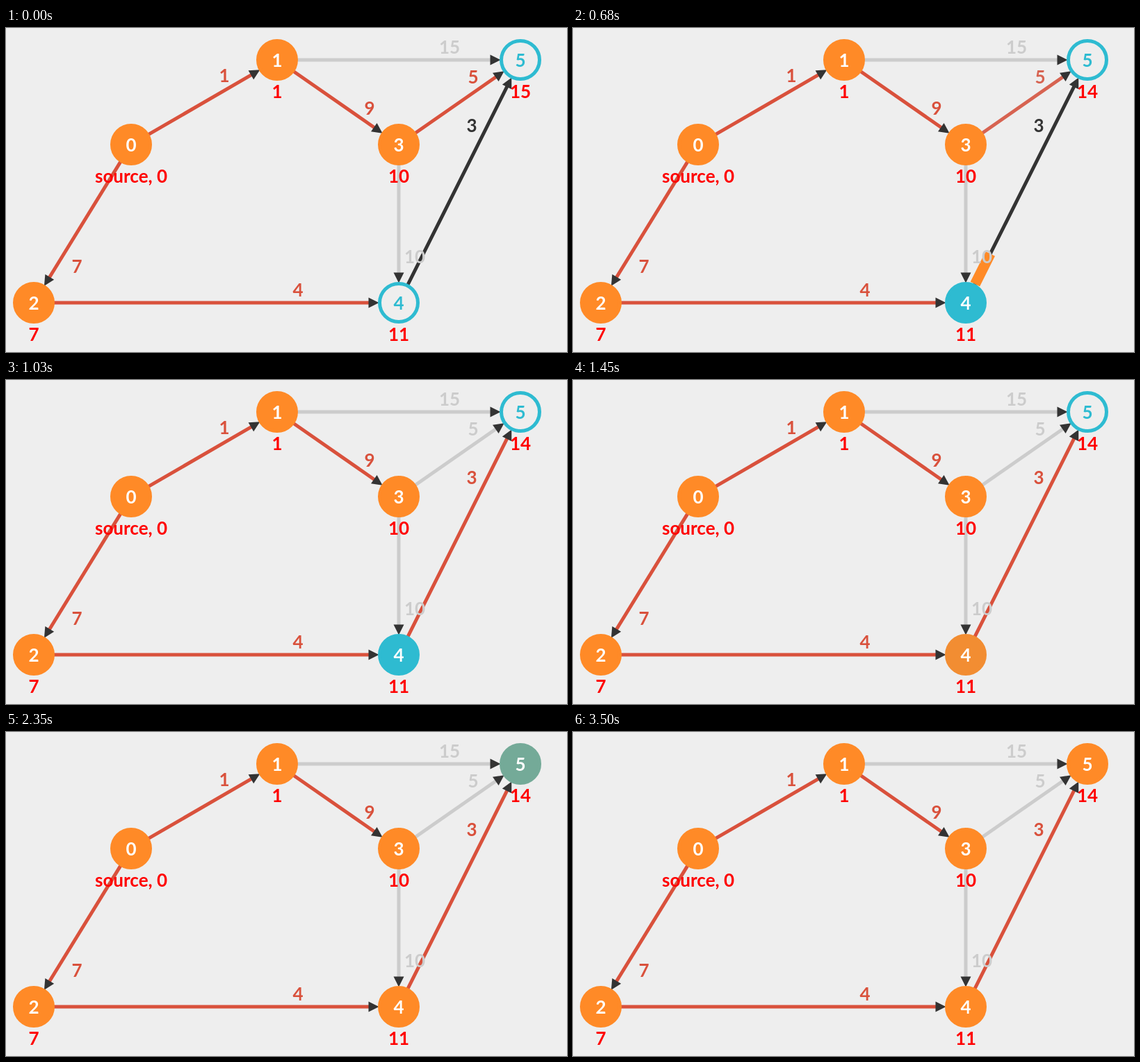
These frames come from a looping animation (807x467 px, 3.7 s). An HTML page:

```html
<!DOCTYPE html>
<html lang="en">
<head>
<meta charset="utf-8">
<title>Shortest paths</title>
<style>
  :root { --bg: #eee; --orange: #ff8a27; --cyan: #2ebbd1; --red: #d9513c; --grey: #ccc; --dark: #333; }
  html, body { margin: 0; width: 100%; height: 100%; overflow: hidden; background: var(--bg); }
  svg { display: block; width: 807px; height: 467px; }
  text { font: 700 26px Lato, "Open Sans", sans-serif; text-anchor: middle; }
  line { stroke-width: 5; }
  circle { stroke-width: 5; fill: var(--orange); stroke: var(--orange); }
  .num { fill: #fff; }
  .dist { fill: #f00; }
  .arrow { fill: var(--dark); }
  .red { --c: var(--red); }
  .grey { --c: var(--grey); }
  line.red, line.grey { stroke: var(--c); }
  text.red, text.grey { fill: var(--c); }

  /* one shared loop; every segment eases in and out like a cubic */
  .v4, .v5, .n4, .n5, .drop, .take, .sweep, .before, .after {
    animation: 3700ms cubic-bezier(.65, 0, .35, 1) infinite both;
  }
  .v4 { animation-name: v4; }
  .v5 { animation-name: v5; }
  .n4 { animation-name: n4; }
  .n5 { animation-name: n5; }
  line.drop { animation-name: dropLine; }
  text.drop { animation-name: dropText; }
  .sweep { animation-name: sweep; stroke: var(--orange); stroke-width: 15; stroke-dasharray: 1 2; }
  .take, .before, .after { animation-timing-function: step-end; }
  line.take { animation-name: takeLine; }
  text.take { animation-name: takeText; }
  .before { animation-name: before; }
  .after { animation-name: after; }

  @keyframes v4 {
    0% { fill: #eee; stroke: #2ebbd1; }
    13.24%, 28.92% { fill: #2ebbd1; stroke: #2ebbd1; }
    42.43%, 100% { fill: #ff8a27; stroke: #ff8a27; }
  }
  @keyframes n4 {
    0% { fill: #2ebbd1; }
    13.24%, 100% { fill: #fff; }
  }
  @keyframes v5 {
    0%, 43.51% { fill: #eee; stroke: #2ebbd1; }
    57.03%, 57.84% { fill: #2ebbd1; stroke: #2ebbd1; }
    70.81%, 100% { fill: #ff8a27; stroke: #ff8a27; }
  }
  @keyframes n5 {
    0%, 43.51% { fill: #2ebbd1; }
    57.03%, 100% { fill: #fff; }
  }
  @keyframes dropLine {
    0%, 13.92% { stroke: #d9513c; }
    27.43%, 100% { stroke: #ccc; }
  }
  @keyframes dropText {
    0%, 13.92% { fill: #d9513c; }
    27.43%, 100% { fill: #ccc; }
  }
  @keyframes sweep {
    0% { stroke-dashoffset: 1; visibility: hidden; }
    13.92% { stroke-dashoffset: 1; visibility: visible; }
    27.43% { stroke-dashoffset: 0; visibility: visible; }
    27.44%, 100% { stroke-dashoffset: 0; visibility: hidden; }
  }
  @keyframes takeLine {
    0% { stroke: #333; }
    27.43%, 100% { stroke: #d9513c; }
  }
  @keyframes takeText {
    0% { fill: #333; }
    27.43%, 100% { fill: #d9513c; }
  }
  @keyframes before {
    0% { opacity: 1; }
    14%, 100% { opacity: 0; }
  }
  @keyframes after {
    0% { opacity: 0; }
    14%, 100% { opacity: 1; }
  }
</style>
</head>
<body>
<svg id="stage" viewBox="0 0 807 467"></svg>
<script>
  const stage = document.getElementById('stage');
  const R = 30;

  function add(tag, attrs, text) {
    const el = document.createElementNS('http://www.w3.org/2000/svg', tag);
    for (const key in attrs) el.setAttribute(key, attrs[key]);
    if (text !== undefined) el.textContent = text;
    return stage.appendChild(el);
  }

  const label = (x, y, cls, text) => add('text', { x, y, class: cls }, text);

  // x, y, distance
  const nodes = [
    [180, 168, 'source, 0'],
    [390, 46, '1'],
    [40, 396, '7'],
    [565, 168, '10'],
    [565, 396, '11'],
    [740, 46, '15']
  ];

  // from, to, weight, weight x, weight y, class
  const edges = [
    [1, 5, 15, 638, 37, 'grey'],
    [3, 4, 10, 588, 339, 'grey'],
    [0, 1, 1, 314, 78, 'red'],
    [0, 2, 7, 102, 353, 'red'],
    [1, 3, 9, 523, 125, 'red'],
    [2, 4, 4, 420, 387, 'red'],
    [3, 5, 5, 672, 80, 'drop'],
    [4, 5, 3, 670, 150, 'take']
  ];

  function drawEdge([from, to, , , , cls]) {
    const [x1, y1] = nodes[from], [x2, y2] = nodes[to];
    const len = Math.hypot(x2 - x1, y2 - y1);
    const angle = Math.atan2(y2 - y1, x2 - x1) * 180 / Math.PI;
    const transform = `translate(${x1} ${y1}) rotate(${angle})`;
    const tip = len - R + 1.5, base = tip - 15;
    add('line', { x1: R - 2, x2: base + 5, transform, class: cls });
    add('path', { d: `M${base} -7.5L${tip} 0L${base} 7.5Z`, transform, class: 'arrow' });
    if (cls === 'take') {
      add('line', { x1: R, x2: len - R, transform, pathLength: 1, class: 'sweep' });
    }
  }

  edges.forEach(drawEdge);
  nodes.forEach(([x, y], i) => {
    add('circle', { cx: x, cy: y, r: R - 2.5, class: 'v' + i });
    label(x, y + 9.5, 'num n' + i, i);
  });
  edges.forEach(([, , weight, x, y, cls]) => label(x, y, cls, weight));
  nodes.forEach(([x, y, dist], i) => label(x, y + 55, i === 5 ? 'dist before' : 'dist', dist));
  label(740, 101, 'dist after', '14');
</script>
</body>
</html>
```
